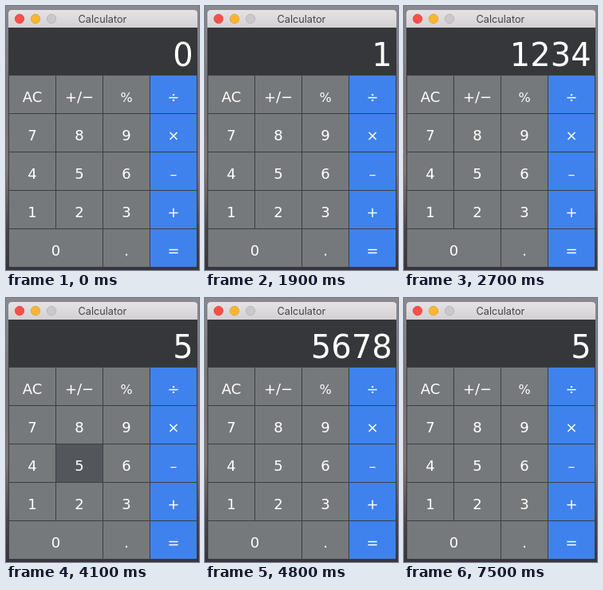
Animation of 242x330 px, one loop 8 s. Source, as an HTML page:

```html
<!DOCTYPE html>
<html lang="en">
<head>
<meta charset="utf-8">
<title>Calculator</title>
<style>
  html, body { margin: 0; width: 100%; height: 100%; overflow: hidden; background: #77747b; }
  svg { display: block; width: 242px; height: 330px; }
  text { fill: #fff; font-family: "DejaVu Sans", sans-serif; text-anchor: middle; }
  .key text { font-size: 18px; }
  #title { font: 12.7px Inter, sans-serif; fill: #454346; }
  #display { font-size: 40px; text-anchor: end; }
</style>
</head>
<body>
<svg id="stage" viewBox="0 0 242 330">
  <defs>
    <linearGradient id="desk" x2="0" y2="1">
      <stop offset="0" stop-color="#8b8890"/>
      <stop offset=".3" stop-color="#77727a"/>
      <stop offset=".62" stop-color="#85736f"/>
      <stop offset=".85" stop-color="#49434a"/>
      <stop offset="1" stop-color="#38343b"/>
    </linearGradient>
    <linearGradient id="bar" x2="0" y2="1">
      <stop offset="0" stop-color="#e5e3e5"/>
      <stop offset="1" stop-color="#d3d1d3"/>
    </linearGradient>
    <clipPath id="frame"><rect x="3" y="5" width="237" height="322" rx="4"/></clipPath>
  </defs>
  <rect width="242" height="330" fill="url(#desk)"/>
  <g clip-path="url(#frame)">
    <rect x="3" y="5" width="237" height="322" fill="#3b3e42"/>
    <rect x="3" y="5" width="237" height="22" fill="url(#bar)"/>
    <rect x="3" y="27" width="237" height="59" fill="#35373b"/>
    <g id="keys"></g>
  </g>
  <g stroke-width=".8">
    <circle cx="17" cy="16" r="5.7" fill="#fb4f4a" stroke="#e0443f"/>
    <circle cx="37" cy="16" r="5.7" fill="#fdb530" stroke="#dfa02a"/>
    <circle cx="57" cy="16" r="5.7" fill="#cac8ca" stroke="#b4b2b4"/>
  </g>
  <text id="title" x="121" y="20.8">Calculator</text>
  <text id="display" x="234.6" y="74.5">0</text>
</svg>
<script>
const LOOP = 8000, HOLD = 100;
const GREY = ['#75797c', '#53565b'], BLUE = ['#3f82ee', '#2e5fae'];
const rows = [
  ['AC', '+/−', '%', '÷'],
  ['7', '8', '9', '×'],
  ['4', '5', '6', '–'],
  ['1', '2', '3', '+'],
  ['0', null, '.', '='],
];
// time of press, key, display after it
const presses = [
  [1700, '1', '1'], [2000, '2', '12'], [2300, '3', '123'], [2600, '4', '1234'],
  [3200, '+', '1234'],
  [4100, '5', '5'], [4300, '6', '56'], [4500, '7', '567'], [4700, '8', '5678'],
  [5400, '=', '6912'],
  [7400, '5', '5'],
];

const display = document.getElementById('display');
const keyLayer = document.getElementById('keys');
const keys = {};

function add(parent, tag, attrs) {
  const el = document.createElementNS('http://www.w3.org/2000/svg', tag);
  for (const name in attrs) el.setAttribute(name, attrs[name]);
  return parent.appendChild(el);
}

rows.forEach((row, r) => row.forEach((label, c) => {
  if (!label) return;
  const x = 4 + c * 59, y = 87 + r * 48;
  const width = label === '0' ? 117 : 58;
  const colors = c === 3 ? BLUE : GREY;
  const group = add(keyLayer, 'g', { class: 'key' });
  const face = add(group, 'rect', { x, y, width, height: 47, fill: colors[0] });
  const text = add(group, 'text', { x: x + width / 2, y: y + 33 });
  text.textContent = label;
  if (label === '%') text.style.fontSize = '16px';
  keys[label] = { face, colors };
}));

function render(t) {
  const last = presses.filter(([at]) => at <= t).pop();
  const down = last && t < last[0] + HOLD ? last[1] : null;
  const value = last ? last[2] : '0';
  if (display.textContent !== value) display.textContent = value;
  for (const label in keys) {
    const { face, colors } = keys[label];
    face.setAttribute('fill', colors[label === down ? 1 : 0]);
  }
}

const start = performance.now();
function tick() {
  render((performance.now() - start) % LOOP);
  requestAnimationFrame(tick);
}
tick();
</script>
</body>
</html>
```
